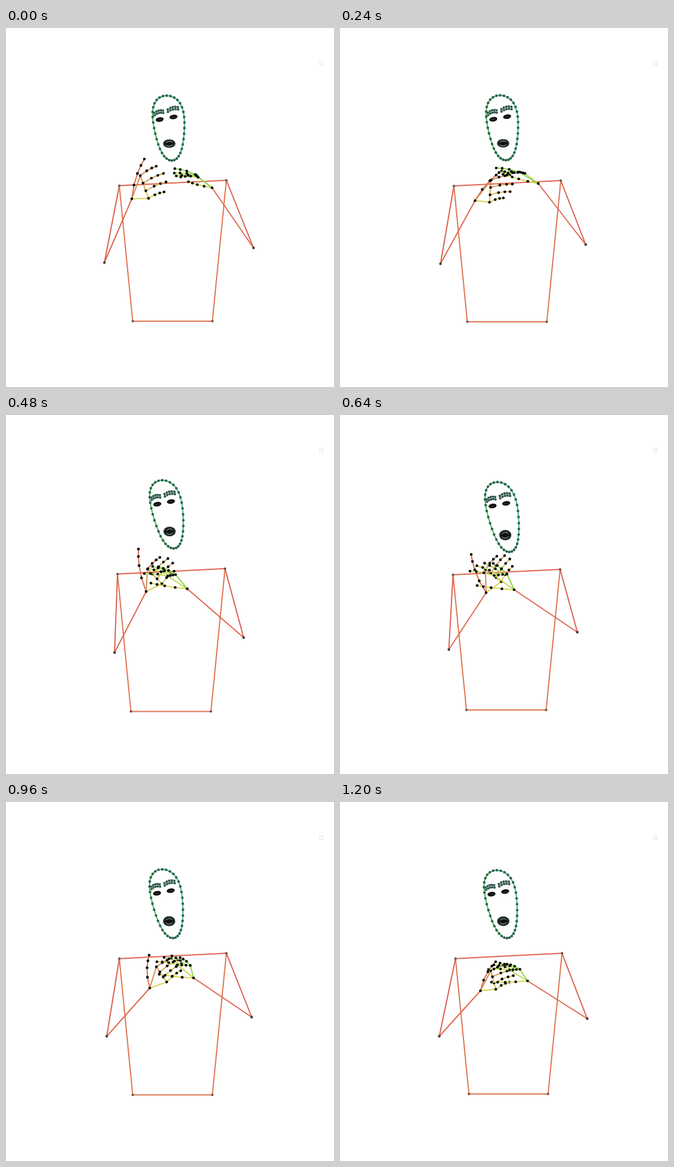
An HTML page with a canvas that plays this animation: 550 px wide and 600 px high, repeating every 1280 ms.

```html
<!DOCTYPE html>
<html lang="en">
<head>
<meta charset="utf-8">
<title>Signing skeleton</title>
<style>
html, body { margin: 0; width: 100%; height: 100%; overflow: hidden; background: #fff; }
canvas { display: block; }
</style>
</head>
<body>
<canvas id="stage" width="550" height="600"></canvas>
<script>
const ctx = document.getElementById('stage').getContext('2d');
const LOOP = 1280, STEP = 80;

// Key poses: one row per time
const times = [0, 240, 480, 640, 800, 960, 1200];
// sideways sway, shoulder drop, hip height
const torso = [
  [0, 0, 490], [1, .5, 491], [-3, 2.3, 495.5], [-.5, 3.5, 493],
  [-3, -.5, 492], [0, -1.7, 489.5], [3.7, -1.7, 488]
];
// left x, y, right x, y
const elbows = [
  [165, 392, 415, 367.5], [168.5, 394, 412, 362], [182, 397, 398.5, 372], [182.5, 392, 398, 363],
  [173.5, 390.5, 407, 358.5], [169, 391.5, 412, 359.5], [166.5, 391.5, 414.5, 362]
];
const wrists = [
  [211, 285.5, 345.5, 267], [226.5, 288.5, 332.5, 260], [235, 295, 304, 290.5], [245, 297, 292, 292],
  [247.5, 302, 307.5, 286.5], [241, 311, 314.5, 294], [235.5, 315.5, 314.5, 299]
];
// tips of thumb, index and little finger
const leftTips = [
  [232, 219, 252, 231, 265, 274], [271, 239, 285, 246, 274, 284], [222, 224, 258, 238, 282, 261],
  [220, 233, 263, 236, 289, 253], [218, 242, 274, 243, 300, 256], [240, 256, 277, 262, 293, 282],
  [261, 267, 280, 272, 284, 301]
];
const rightTips = [
  [306, 257, 293, 249, 283, 235], [280, 246, 282, 243, 262, 234], [243, 281, 232, 265, 256, 254],
  [230, 285, 218, 261, 257, 248], [251, 272, 245, 246, 285, 236], [257, 288, 253, 267, 292, 260],
  [254, 301, 249, 280, 280, 271]
];
// crown and chin
const head = [
  [269.5, 113, 278, 221.5], [268.5, 112.5, 278, 221], [262, 109, 281, 223], [264, 112, 284, 229],
  [261, 110.5, 281, 228.5], [262, 112.5, 280, 227.5], [263, 114, 280, 227.5]
];

// Knuckles as [share of the way to the tip, sideways offset]; the rest are bends in px
const leftHand = { index: [.58, 12], little: [.5, -5], thumb: 4, spread: 8, curl: 1.5, hue: 14, range: 44 };
const rightHand = { index: [.5, -9], little: [.5, -7], thumb: 1, spread: 5, curl: -1.5, hue: 60, range: 34 };

const pairs = list => Array.from({ length: list.length >> 1 }, (_, i) => [list[2 * i], list[2 * i + 1]]);

// Point at share u from a to b, moved h px sideways
function along([ax, ay], [bx, by], u, h = 0) {
  const dx = bx - ax, dy = by - ay, k = h / (Math.hypot(dx, dy) || 1);
  return [ax + dx * u + dy * k, ay + dy * u - dx * k];
}
const bow = (a, b, bend, shares) => shares.map(u => along(a, b, u, bend * 4 * u * (1 - u)));

// Smooth curve through the key poses
function sample(track, t) {
  const last = times.length - 1;
  let k = 0;
  while (k < last - 1 && times[k + 1] <= t) k++;
  const span = times[k + 1] - times[k], u = (t - times[k]) / span;
  const slope = (i, j) => {
    const a = Math.max(i - 1, 0), b = Math.min(i + 1, last);
    return (track[b][j] - track[a][j]) / (times[b] - times[a]) * span;
  };
  return track[k].map((a, j) => {
    const d = track[k + 1][j] - a, m = slope(k, j), n = slope(k + 1, j);
    return a + u * (m + u * (3 * d - 2 * m - n + u * (m + n - 2 * d)));
  });
}

function line(points, color, width = 2) {
  ctx.strokeStyle = color;
  ctx.lineWidth = width;
  ctx.beginPath();
  points.forEach(p => ctx.lineTo(...p));
  ctx.stroke();
}

function dots(points, color, r) {
  ctx.fillStyle = color;
  for (const [x, y] of points) {
    ctx.beginPath();
    ctx.arc(x, y, r, 0, 7);
    ctx.fill();
  }
}

function oval(x, y, rx, ry, tilt, color) {
  ctx.fillStyle = color;
  ctx.beginPath();
  ctx.ellipse(x, y, rx, ry, tilt, 0, 7);
  ctx.fill();
}

function drawBody([sway, drop, hipY], [le, re], [lw, rw]) {
  const ls = [190 + sway, 263.5 + drop], rs = [369.5 + sway * .75, 254.5 + drop];
  const lh = [212.5 + sway, hipY], rh = [346 + sway * .8, hipY];
  line([ls, lh, rh, rs], '#de7652');
  line([ls, rs], '#df654f');
  for (const [s, e, w] of [[ls, le, lw], [rs, re, rw]]) {
    line([s, e], '#da6250');
    line([e, w], '#df684f');
  }
  dots([ls, rs, lh, rh], '#6b534c', 2.1);
  dots([le, re], '#453c3a', 2.2);
}

function drawHand(wrist, [thumbTip, indexTip, littleTip], hand) {
  const index = along(wrist, indexTip, ...hand.index);
  const little = along(wrist, littleTip, ...hand.little);
  const fingers = [bow(wrist, thumbTip, hand.thumb, [.33, .62, .83, 1])];
  for (let i = 0; i < 4; i++) {
    const u = i / 3, outward = i % 3 ? hand.spread : 0;
    const tip = along(indexTip, littleTip, u, outward);
    fingers.push(bow(along(index, little, u), tip, hand.curl, [0, .43, .74, 1]));
  }
  const tint = i => `hsl(${hand.hue + hand.range * i / 4}, 62%, 58%)`;
  for (const i of [0, 1, 4]) line([wrist, fingers[i][0]], tint(i));
  for (let i = 1; i < 4; i++) line([fingers[i][0], fingers[i + 1][0]], tint(i + .5));
  fingers.forEach((f, i) => line(f, tint(i)));
  dots([wrist, ...fingers.flat()], '#080808', 2.3);
}

function drawFace([crown, chin]) {
  const height = chin[1] - crown[1];
  // x from the face's slanted axis, y down from the crown
  const at = (x, y) => [crown[0] + (chin[0] - crown[0]) * y / height + x, crown[1] + y];

  const edge = Array.from({ length: 36 }, (_, i) => {
    const a = i * Math.PI / 18, c = Math.cos(a);
    return at(Math.sin(a) * (25.4 + 6 * c + 5.5 * c * c), height * (1 - c) / 2);
  });
  line(edge.slice(0, 19), '#43b988');
  line([...edge.slice(18), edge[0]], '#43b95f');
  dots(edge, '#2b6449', 2.2);

  for (const [x, y, step] of [[-23, 28.5, 3.7], [0, 22.7, 4.3]])
    for (const lift of [0, 4])
      for (let i = 0; i < 5; i++)
        dots([at(x + i * step, y - lift + .5 * (i - 3) ** 2)], '#31594f', 2.1);

  for (const [ex, ey] of [[-15, 40], [8.6, 35.7]]) {
    const [x, y] = at(ex, ey);
    oval(x, y, 6.8, 3.8, -.16, '#111');
    line([[x - 3, y + .8], [x + 3, y - .3]], '#555', .7);
  }

  // The lips open as the jaw drops
  const [x, y] = at(-2, height - 28.3), open = 7.2 + (height - 108.5) * .2;
  oval(x, y, 9, open - 1, -.08, '#111');
  const lips = Array.from({ length: 20 }, (_, i) => {
    const a = i * Math.PI / 10;
    return [x + 8.6 * Math.cos(a), y + (open - 1.7) * Math.sin(a)];
  });
  dots(lips, '#1b2a26', 1.7);
  ctx.strokeStyle = '#bbb';
  ctx.lineWidth = 1;
  for (const [dy, from, to] of [[.5, .5, 2.64], [0, 3.7, 5.7]]) {
    ctx.beginPath();
    ctx.ellipse(x, y + dy, 6, open * .5, -.08, from, to);
    ctx.stroke();
  }
}

function draw(now) {
  const t = Math.floor(now % LOOP / STEP) * STEP;
  const pose = track => pairs(sample(track, t));
  ctx.fillStyle = '#fff';
  ctx.fillRect(0, 0, 550, 600);
  ctx.lineJoin = ctx.lineCap = 'round';
  ctx.strokeStyle = '#e2e2e2';
  ctx.lineWidth = 1;
  ctx.strokeRect(526.5, 56.5, 5, 6);

  const hands = pose(wrists);
  drawBody(sample(torso, t), pose(elbows), hands);
  drawFace(pose(head));
  drawHand(hands[0], pose(leftTips), leftHand);
  drawHand(hands[1], pose(rightTips), rightHand);
}

let start;
function tick(now) {
  start ??= now;
  draw(now - start);
  requestAnimationFrame(tick);
}
draw(0);
requestAnimationFrame(tick);
</script>
</body>
</html>
```
